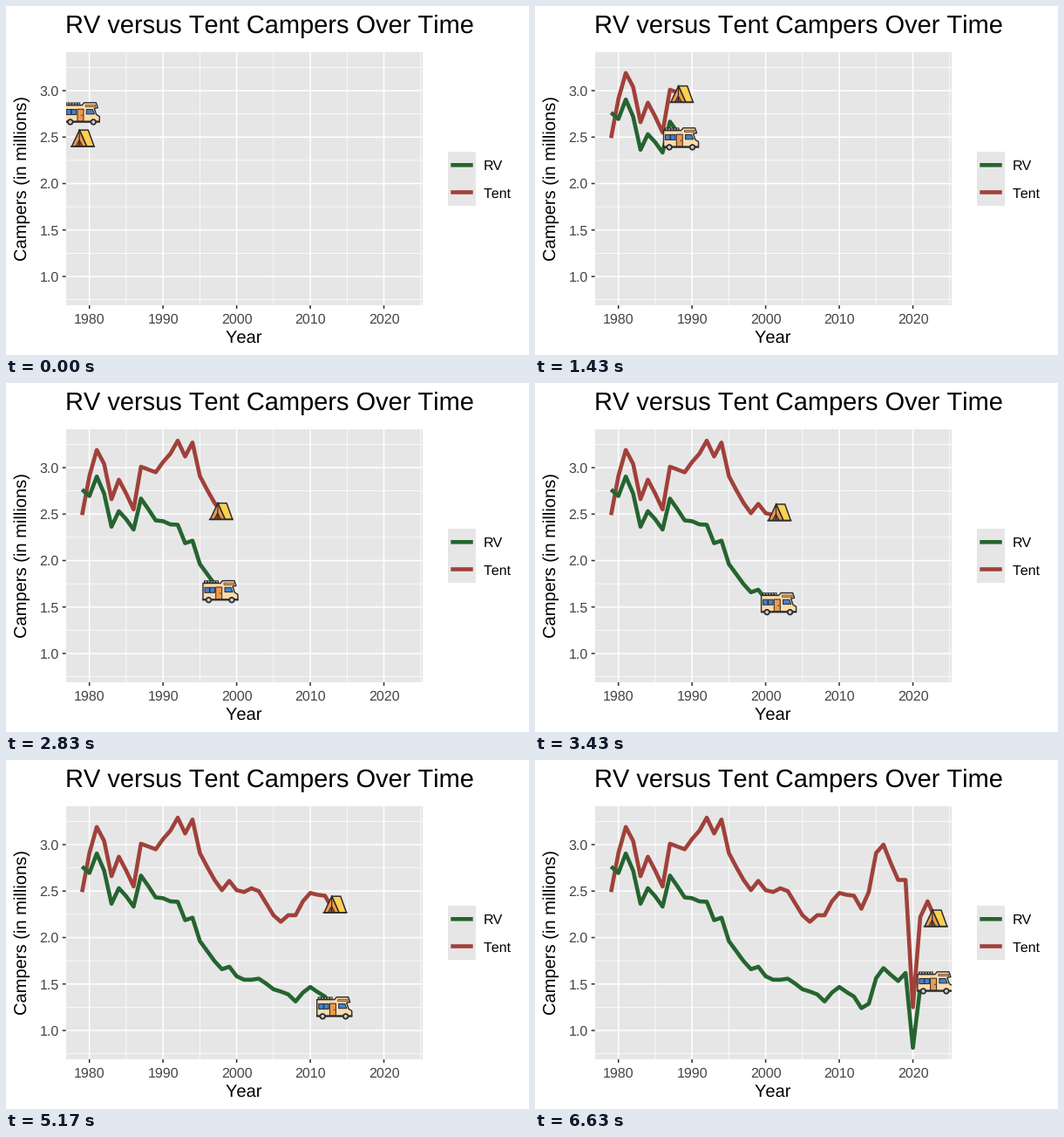
Recreate the animation shown at these times as a matplotlib script. Size 600x400 px, loop 10000 ms.

```python
import numpy as np
import matplotlib.pyplot as plt
from matplotlib.animation import FuncAnimation
from matplotlib.patches import Circle, Polygon, Rectangle
from matplotlib.transforms import Affine2D

plt.rcParams["font.family"] = "Liberation Sans"
plt.rcParams["text.hinting"] = "none"
plt.rcParams["text.kerning_factor"] = 6  # plain advances, no pair kerning

W, H, DPI = 600, 400, 100
PT = 72 / DPI
INTERVAL, LOOP = 20, 10000
STEPS, STEP_MS = 199, 1000 / 30
FIRST, LAST = 1979, 2023
LEFT, TOP, RIGHT, BOTTOM = 68.7, 53.2, 477.6, 343.0

GREY, GREEN, RED = "#e6e6e6", "#25642f", "#a0413a"
INK, CREAM, ORANGE, BLUE, YELLOW = "#2b2b2d", "#fbdcab", "#f1994a", "#3f7fd6", "#fcd052"

years = np.arange(FIRST, LAST + 1)
tent = np.array([
    2.49, 2.91, 3.19, 3.04, 2.66, 2.87, 2.72, 2.55, 3.01, 2.98, 2.95, 3.06,
    3.15, 3.29, 3.12, 3.27, 2.91, 2.76, 2.62, 2.51, 2.61, 2.51, 2.49, 2.53,
    2.5, 2.37, 2.24, 2.17, 2.24, 2.24, 2.39, 2.48, 2.46, 2.45, 2.31, 2.49,
    2.91, 3, 2.8, 2.62, 2.62, 1.25, 2.22, 2.39, 2.21])

# RV campers as a slowly drifting share of tent campers, set every second year
share = [1.294, 0.926, 0.895, 0.882, 0.915, 0.857, 0.792, 0.725, 0.677, 0.672,
         0.661, 0.631, 0.611, 0.635, 0.654, 0.586, 0.592, 0.557, 0.517, 0.557,
         0.585, 0.651, 0.67, 0.71]
rv = tent * np.interp(years, np.arange(1978, 2025, 2), share)


def px(year):
    return 95.7 + (year - 1980) * 8.446


def py(value):
    return 97.0 + (3.0 - value) * 106.5


fig = plt.figure(figsize=(W / DPI, H / DPI), dpi=DPI, facecolor="white")
ax = fig.add_axes([0, 0, 1, 1])
ax.set_xlim(0, W)
ax.set_ylim(H, 0)
ax.axis("off")


def line(xs, ys, color, width, z):
    return ax.plot(xs, ys, color=color, lw=width * PT, zorder=z, snap=False,
                   solid_capstyle="butt", solid_joinstyle="round")[0]


def label(x, y, text, size, color="black", ha="left", turn=0):
    ax.text(x, y, text, fontsize=size * PT, color=color, ha=ha, va="baseline",
            rotation=turn, rotation_mode="anchor")


# Panel, grid and axes
panel = Rectangle((LEFT, TOP), RIGHT - LEFT, BOTTOM - TOP, fc=GREY, lw=0, zorder=0)
ax.add_patch(panel)

for year in range(1980, 2026, 5):
    x, major = px(year), year % 10 == 0
    line([x, x], [TOP, BOTTOM], "white", 1.54 if major else 0.77, 1 + major)
    if major:
        line([x, x], [BOTTOM, BOTTOM + 4], "#333333", 1.54, 2)
        label(x, 364.3, str(year), 16, "#454545", "center")
for quarter in range(3, 14):
    value, major = quarter / 4, quarter % 2 == 0
    y = py(value)
    line([LEFT, RIGHT], [y, y], "white", 1.54 if major else 0.77, 1 + major)
    if major:
        line([LEFT - 4, LEFT], [y, y], "#333333", 1.54, 2)
        label(60.8, y + 5.8, f"{value:.1f}", 16, "#454545", "right")

label(68.3, 31.3, "RV versus Tent Campers Over Time", 29, )
label(273.2, 385.8, "Year", 20.2, ha="center")
label(24.2, 197.2, "Campers (in millions)", 20.2, ha="center", turn=90)

# Legend
ax.add_patch(Rectangle((507, 167), 32, 62.3, fc=GREY, lw=0))
for y, color, name in [(182.3, GREEN, "RV"), (213.5, RED, "Tent")]:
    line([510.3, 535.7], [y, y], color, 4.6, 3)
    label(547.6, y + 5.9, name, 16)


class Icon:
    """A group of shapes drawn around (0, 0) and moved as one."""

    def __init__(self, z):
        self.z = z
        self.shift = Affine2D()

    def add(self, patch, fill, edge):
        patch.set(facecolor=fill, edgecolor=INK, linewidth=edge * PT,
                  zorder=self.z, joinstyle="round", snap=False,
                  transform=self.shift + ax.transData)
        ax.add_patch(patch)
        patch.set_clip_path(panel)
        self.z += 0.01

    def poly(self, points, fill, edge=1.0):
        self.add(Polygon(points), fill, edge)

    def box(self, x, y, w, h, fill, edge=0.0):
        self.add(Rectangle((x, y), w, h), fill, edge)

    def disc(self, x, y, r, fill):
        self.add(Circle((x, y), r), fill, 0)

    def move(self, x, y):
        self.shift.clear().translate(x, y)


def make_rv(z):
    icon = Icon(z)
    icon.box(-19, -13, 17, 3, INK)
    for x in np.arange(-17.5, -3, 3.2):
        icon.box(x, -12, 1.6, 1.2, GREY)
    icon.poly([(-20, -9.8), (0, -9.8), (2.5, -12.7), (16, -12.7), (18, -7),
               (14, -6), (16.5, 1), (20, 3), (20, 9), (-20, 9)], CREAM, 1.4)
    icon.box(4, -10.2, 11.5, 2.4, ORANGE, 0.6)
    for x in (-18, -12):
        icon.box(x, -5, 5.5, 6, BLUE, 1)
    icon.box(-5.3, -5.3, 7, 14, ORANGE, 1)
    icon.box(-0.8, 1.2, 1.3, 1.3, INK)
    icon.poly([(5, -5), (12, -5), (14.2, 0.3), (5, 0.3)], BLUE)
    icon.box(-20.6, 8, 41.2, 2.2, INK)
    for x in (-13.5, 13):
        icon.disc(x, 9.4, 3.7, INK)
        icon.disc(x, 9.4, 1.9, "#c9cdd2")
    return icon


def make_tent(z):
    icon = Icon(z)
    top = (-3.8, -9.3)
    icon.poly([top, (6.3, -9.3), (13, 9.3), (4.5, 9.3)], YELLOW, 1.5)
    icon.poly([top, (4.5, 9.3), (-12.5, 9.3)], ORANGE, 1.5)
    icon.poly([(-4, 2), (0, 9.3), (-8, 9.3)], "#8a5230")
    icon.box(-4.5, -10.5, 1.2, 19, INK)
    icon.box(-14, 8.6, 28, 1.7, INK)
    return icon


series = []
for z, values, color, make, dx, dy in [(4, tent, RED, make_tent, 0.8, 0.2),
                                       (5, rv, GREEN, make_rv, 0, 1.4)]:
    path = line([], [], color, 4.6, z)
    path.set_clip_path(panel)
    series.append((values, path, make(z + 3), dx, dy))


def update(frame):
    step = min(round(frame * INTERVAL / STEP_MS), STEPS)
    now = FIRST + (LAST - FIRST) * step / STEPS
    past = years < now
    xs = px(np.append(years[past], now))
    for values, path, icon, dx, dy in series:
        ys = py(np.append(values[past], np.interp(now, years, values)))
        path.set_data(xs, ys)
        icon.move(xs[-1] + dx, ys[-1] + dy)
    return []


anim = FuncAnimation(fig, update, frames=LOOP // INTERVAL, interval=INTERVAL,
                     init_func=lambda: update(0), repeat=True, repeat_delay=0)
plt.show()
```
